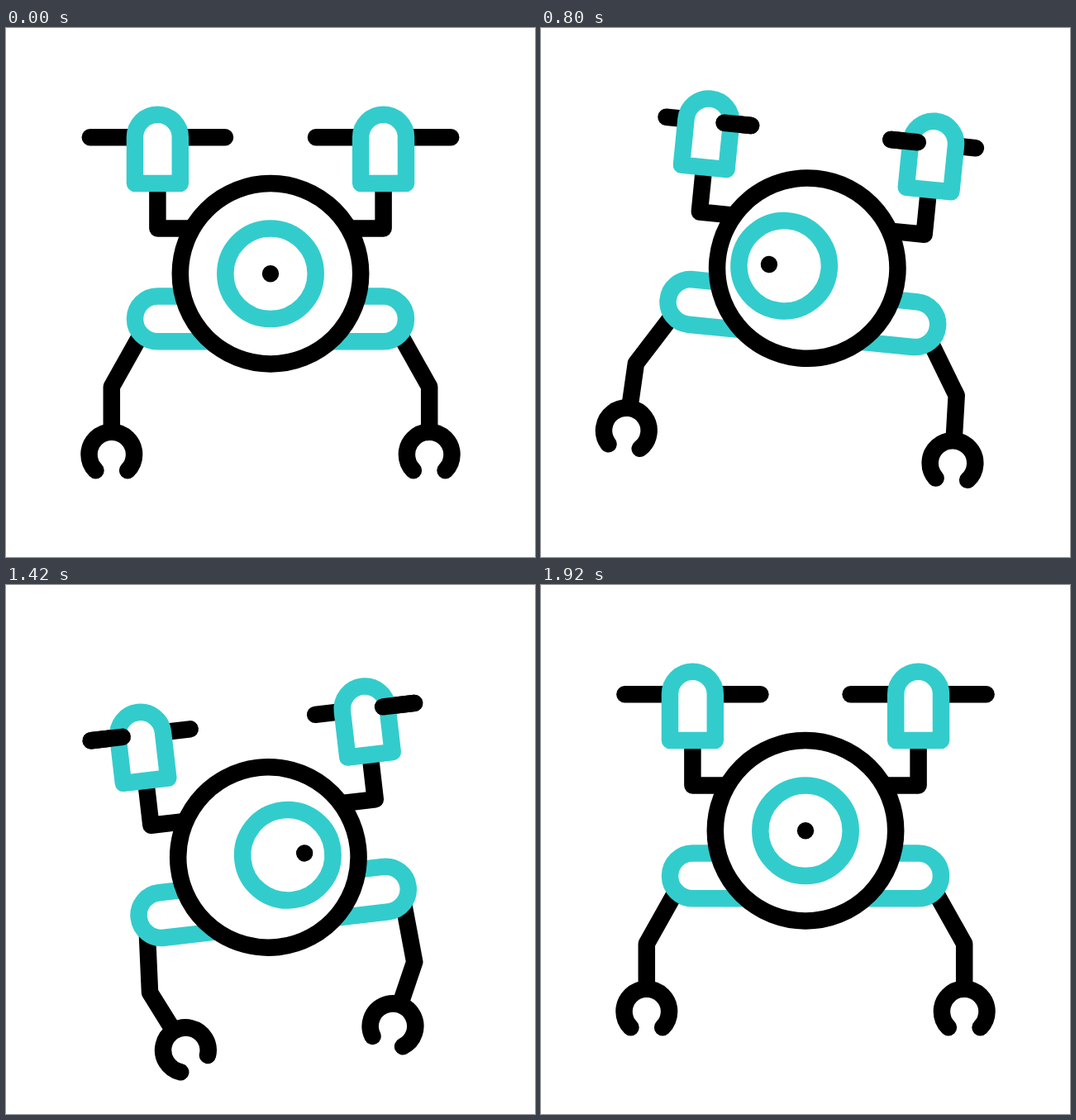
An HTML page that plays this animation: 640 by 640 pixels, repeating every 2.2 s.

```html
<!DOCTYPE html>
<html lang="en">
<head>
<meta charset="utf-8">
<title>Drone</title>
<style>
  html, body { margin: 0; width: 100%; height: 100%; overflow: hidden; background: #fff; }
  svg { display: block; width: 100%; height: 100%; }
  .ink, .teal { stroke-width: 20.5; stroke-linecap: round; stroke-linejoin: round; }
  .ink { stroke: #000; fill: none; }
  .teal { stroke: #3cc; fill: #fff; }
</style>
</head>
<body>
<svg viewBox="0 0 640 640">
  <g id="drone">
    <g id="half">
      <g id="arm" class="ink">
        <path d="M164 369.5L127.8 434V488"/>
        <path d="M108.5 535.3a27.3 27.3 0 1 1 38.6 0"/>
      </g>
      <path class="ink" d="M183.4 188V242.4H230"/>
      <path id="rotor" class="ink"/>
      <path class="teal" d="M156 188V132.2a27.4 27.4 0 0 1 54.8 0V188Z"/>
      <path id="blade" class="ink"/>
    </g>
    <use href="#half" transform="matrix(-1 0 0 1 640 0)"/>
    <rect class="teal" x="156" y="324.5" width="328" height="54.8" rx="27.4"/>
    <circle class="ink" style="fill:#fff" cx="320" cy="297.2" r="109.2"/>
    <circle id="iris" class="teal" cy="297.2" r="54.7"/>
    <circle id="pupil" cy="297.2" r="10.2"/>
  </g>
</svg>
<script>
  const LOOP = 2200, END = 1920; // the drone rests from END to LOOP
  const BEAT = 488;              // half a swing
  const SPIN = 455, SWEEP = 425; // a blade starts every SPIN and crosses in SWEEP

  const ramp = (t, from, to) => Math.min(1, Math.max(0, (t - from) / (to - from)));
  const ease = (t, from, to) => {
    const u = ramp(t, from, to);
    return u * u * (3 - 2 * u);
  };

  // Leaves rest for a, reached at start, swings to b and back, then returns to rest.
  function sway(t, start, a, b) {
    const mid = start + BEAT, last = mid + BEAT;
    const swing = ease(t, start, mid) - ease(t, mid, last);
    return a * (ease(t, 0, start) - ease(t, last, END)) + (b - a) * swing;
  }

  // Looks left, then right, then ahead.
  function gaze(t, left, right) {
    const cross = ease(t, 720, 1200);
    return left * (ease(t, 110, 510) - cross) + right * (cross - ease(t, 1290, 1680));
  }

  const set = (id, name, value) => document.getElementById(id).setAttribute(name, value);
  const bar = (from, to) => `M${183.4 + from} 132.2H${183.4 + to}`;

  function draw() {
    const t = performance.now() % LOOP;
    const drop = sway(t, 510, 35.3, -30), tilt = sway(t, 440, -6.6, 8.2);
    set('drone', 'transform', `translate(0 ${drop}) rotate(${tilt} 320 320)`);
    set('arm', 'transform', `rotate(${-sway(t, 440, 25.3, -8)} 164 369.5)`);
    set('iris', 'cx', 320 + gaze(t, -33.2, 32));
    set('pupil', 'cx', 320 + gaze(t, -55.3, 59.8));

    // The near blade crosses in front of the motor, from the outer side to the inner.
    const turn = t < 4 * SPIN ? t % SPIN : SPIN;
    const s = 2 * ramp(turn, 0, SWEEP) - 1;
    set('rotor', 'd', bar(-82 * s, 82 * s));
    set('blade', 'd', Math.abs(s) < .97 ? bar(30 * s, 82 * s) : '');
    requestAnimationFrame(draw);
  }
  draw();
</script>
</body>
</html>
```
